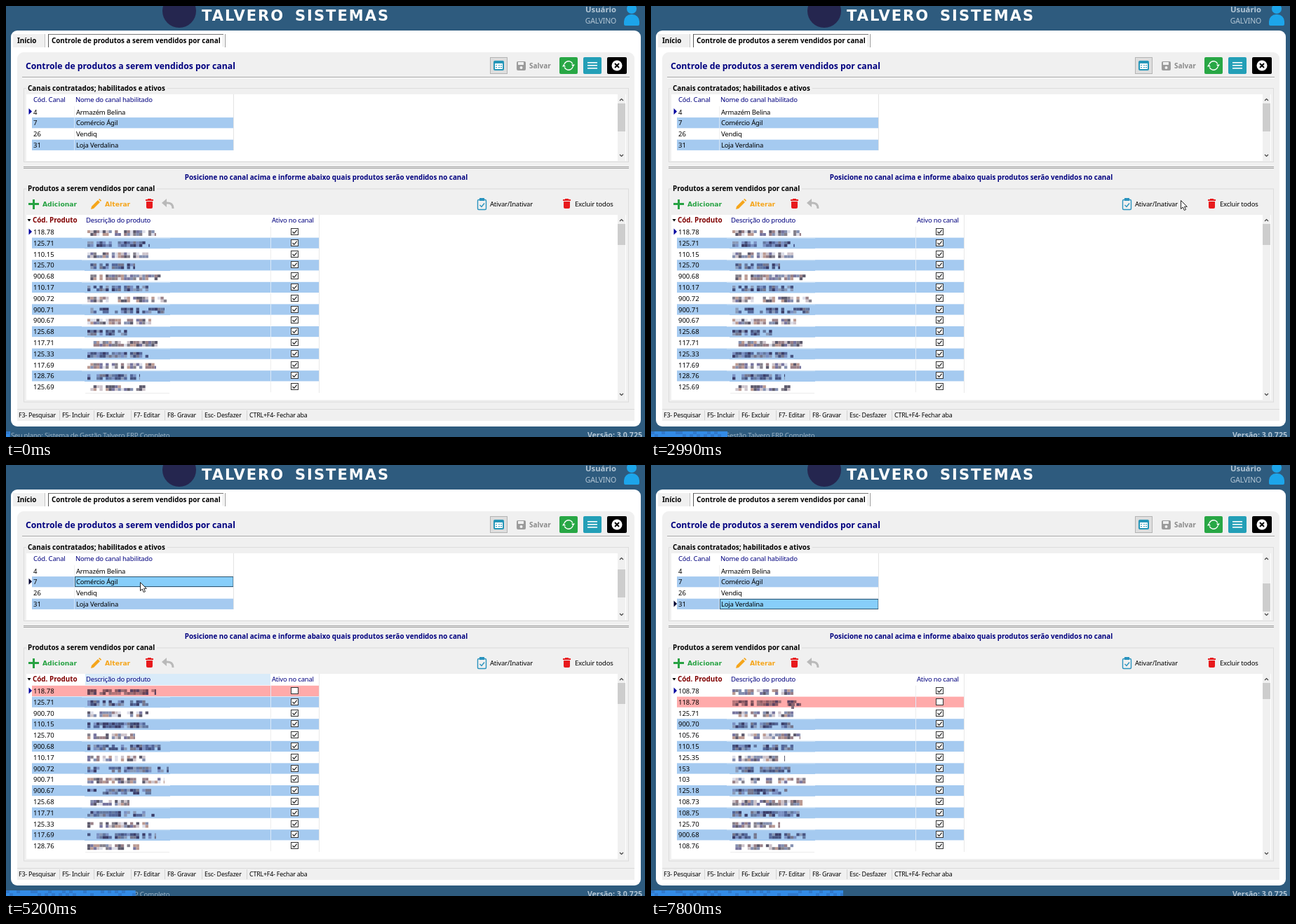
An HTML page with a canvas that plays this animation: 911x615 px, repeating every 8000 ms.

```html
<!DOCTYPE html>
<html lang="pt-BR">
<head>
<meta charset="utf-8">
<title>Controle de produtos</title>
<style>
html, body { margin: 0; width: 100%; height: 100%; overflow: hidden; background: #2e5b7e; }
canvas { display: block; width: 911px; height: 615px; }
</style>
</head>
<body>
<canvas id="stage" width="911" height="615"></canvas>
<script>
const g = document.getElementById('stage').getContext('2d');
const LOOP = 8000, STEP = 200, ROW = 15.8;
const NAVY = '#00007f', BLUE = '#a5caf0', PANEL = '#f0f0f0', SELECT = '#87cefa';

const CHANNELS = [['4', 'Armazém Belina'], ['7', 'Comércio Ágil'], ['26', 'Vendiq'], ['31', 'Loja Verdalina']];
const LIST_A = '118.78 125.71 110.15 125.70 900.68 110.17 900.72 900.71 900.67 125.68 117.71 125.33 117.69 128.76 125.69'.split(' ');
const LIST_B = [...LIST_A.slice(0, 2), '900.70', ...LIST_A.slice(2, 14)];
const LIST_C = '108.78 118.78 125.71 900.70 105.76 110.15 125.35 153 103 125.18 108.73 108.75 125.70 900.68 108.76'.split(' ');

// Right edge of each blurred description; others end at 203.
const BLUR_END = {
  '118.78': 214, '125.71': 205, '125.70': 184, '900.68': 221, '900.72': 232, '900.71': 226,
  '900.67': 207, '125.68': 176, '117.71': 217, '117.69': 214, '128.76': 191, '125.69': 199,
  '105.76': 213, '125.35': 191, '153': 208, '103': 221, '125.18': 195, '108.73': 217, '108.75': 217
};
const BLUR_COLORS = {
  white: ['#5d5a6c', '#9a8188', '#8590b0', '#cdc3ca', '#77759f', '#bb9a92', '#dcdde8', '#85818c'],
  blue: ['#475480', '#64789f', '#7b90c2', '#3b3d68', '#75768c', '#8a9ab8', '#54679a'],
  pink: ['#6d4655', '#8f5c64', '#b47378', '#5b4362', '#9c7076']
};

// Step, x, y of the pointer tip.
const PATH = [
  [3, 706, 598], [6, 622, 443], [9, 625, 330], [10, 625, 309], [12, 625, 309], [13, 700, 249],
  [14, 755, 276], [16, 755, 277], [18, 434, 349], [20, 433, 346], [22, 276, 279], [24, 190, 172],
  [25, 190, 166], [28, 192, 170], [30, 195, 183], [32, 196, 181], [33, 191, 201], [34, 191, 201],
  [35, 197, 262], [36, 199, 320], [37, 196, 334], [39, 196, 336]
];

function random(seed) {
  return () => {
    seed = (seed * 1664525 + 1013904223) >>> 0;
    return seed / 4294967296;
  };
}

function box(x, y, w, h, color) {
  g.fillStyle = color;
  g.fillRect(x, y, w, h);
}

function frame(x, y, w, h, color) {
  g.strokeStyle = color;
  g.lineWidth = 1;
  g.strokeRect(x + .5, y + .5, w - 1, h - 1);
}

function round(x, y, w, h, r, color) {
  g.fillStyle = color;
  g.beginPath();
  g.roundRect(x, y, w, h, r);
  g.fill();
}

function disc(x, y, r, color) {
  g.fillStyle = color;
  g.beginPath();
  g.arc(x, y, r, 0, 7);
  g.fill();
}

function shape(points, color) {
  g.fillStyle = color;
  g.beginPath();
  points.forEach(([x, y]) => g.lineTo(x, y));
  g.closePath();
  g.fill();
}

function line(points, color, width = 1) {
  g.strokeStyle = color;
  g.lineWidth = width;
  g.beginPath();
  points.forEach(([x, y], i) => i ? g.lineTo(x, y) : g.moveTo(x, y));
  g.stroke();
}

function text(str, x, y, { color = '#000', size = 9.5, bold = false, track = -.2, align = 'left', family = '"Noto Sans"' } = {}) {
  g.font = `${bold ? 'bold ' : ''}${size}px ${family}, sans-serif`;
  g.letterSpacing = track + 'px';
  g.textAlign = align;
  g.fillStyle = color;
  g.fillText(str, x, y);
}

const boldText = (str, x, y, opt) => text(str, x, y, { bold: true, size: 9.85, track: 0, ...opt });
const wideText = (str, x, y, color, size = 9.2, track = 0) =>
  text(str, x, y, { color, size, track, bold: true, family: '"DejaVu Sans"' });

function trash(x, y) {
  box(x, y + 1, 11, 2, '#e8191c');
  box(x + 3, y, 5, 1, '#e8191c');
  round(x + 1, y + 4, 9, 10, [0, 0, 2, 2], '#e8191c');
}

function header() {
  box(0, 0, 911, 615, '#2e5b7e');
  disc(247, 7, 24, '#25264f');
  wideText('TALVERO', 279, 20.5, '#fff', 21, 2);
  wideText('SISTEMAS', 412, 20.5, '#fff', 21, 2);
  boldText('Usuário', 870, 9, { size: 11.3, color: '#b3c6d5', align: 'right' });
  text('GALVINO', 870, 25, { size: 10.5, color: '#b3c6d5', align: 'right' });
  disc(892, 4, 7, '#1da5ea');
  round(881, 12, 22, 16, [10, 10, 2, 2], '#1da5ea');
}

function titleBar() {
  round(7, 35, 898, 565, 9, '#fff');
  box(10, 40, 45, 19, PANEL);
  boldText('Início', 16, 53);
  box(55, 40, 1, 19, '#c4c4c4');
  box(60, 40, 250, 1, '#777');
  box(60, 40, 1, 19, '#555');
  box(309, 41, 1, 17, '#ddd');
  box(312, 40, 1, 19, '#999');
  boldText('Controle de produtos a serem vendidos por canal', 65, 53);
  round(16, 66, 880, 526, [9, 9, 0, 0], PANEL);
  boldText('Controle de produtos a serem vendidos por canal', 28, 89.5, { size: 12.23, color: NAVY });
  box(23, 101, 866, 1, '#a4a4a4');
  box(23, 102, 866, 1, '#fff');

  box(690, 73, 25, 24, '#dedede');
  frame(690, 73, 25, 24, '#b4b4b4');
  round(695, 78, 15, 14, 2, '#2596b8');
  box(697, 82, 11, 8, '#fff');
  for (const y of [84, 87]) for (const x of [698, 702, 705]) box(x, y, 2, 1, '#2596b8');

  round(728, 79, 13, 13, 2, '#9b9b9b');
  box(730, 80, 8, 4, PANEL);
  disc(734.5, 88, 2, PANEL);
  boldText('Salvar', 746, 89, { size: 10, color: '#8b8b8b' });

  round(789, 73, 26, 24, 2, '#28a745');
  g.strokeStyle = '#fff';
  g.lineWidth = 1.4;
  for (const a of [Math.PI, 0]) {
    g.beginPath();
    g.arc(802, 85, 6.3, a + .25, a + 2.75);
    g.stroke();
  }
  shape([[793, 86.5], [798, 86.5], [795, 83]], '#fff');
  shape([[806, 83.5], [811, 83.5], [808.5, 87]], '#fff');

  round(823, 73, 26, 24, 2, '#239fb7');
  for (const y of [80, 84, 88]) box(829, y, 14, 1.6, '#fff');
  round(857, 73, 28, 24, 2, '#000');
  disc(871, 85, 7.5, '#fff');
  line([[868, 82], [874, 88]], '#000', 2);
  line([[874, 82], [868, 88]], '#000', 2);
}

function group(label, y, h, width) {
  frame(25, y, 863, h, '#dcdcdc');
  box(29, y - 3, width, 7, PANEL);
  boldText(label, 31, y + 3.5);
}

function scrollbar(top, bottom, thumb, size) {
  box(872, top, 11, bottom - top, PANEL);
  box(872, thumb, 11, size, '#cdcdcd');
  line([[875, top + 9], [877.5, top + 6.5], [880, top + 9]], '#444', 1.2);
  line([[875, bottom - 9], [877.5, bottom - 6.5], [880, bottom - 9]], '#444', 1.2);
}

const rowMark = (y, color) => shape([[32.5, y - 4.5], [37, y], [32.5, y + 4.5]], color);

function selectedCell(x, y, w, h) {
  box(x, y, w, h, SELECT);
  frame(x, y, w, h, '#2f5670');
}

function channelGrid(current, focused) {
  group('Canais contratados; habilitados e ativos', 117, 106, 201);
  box(29, 126, 855, 95, '#fff');
  text('Cód. Canal', 39, 137, { color: NAVY });
  text('Nome do canal habilitado', 99, 137, { color: NAVY });
  CHANNELS.forEach(([code, name], i) => {
    const y = 150.5 + i * ROW, top = y - 7.2;
    if (i % 2) box(37, top, 287.5, 15.2, BLUE);
    box(97, top, 1, 15.2, i % 2 ? '#d5e6f7' : '#f0f0f0');
    if (focused && i === current) selectedCell(98, Math.round(top), 226.5, 15);
    text(code, 39, y + 4, { track: 0 });
    text(name, 100, y + 4);
    if (i === current) rowMark(y, focused ? '#000030' : '#0000a0');
  });
  box(324, 126, 1, 80, '#e4e4e4');
  scrollbar(126, 221, [139, 149, 159, 169][current], 40);
}

function productTools() {
  box(25, 229, 863, 1, '#a0a0a0');
  box(25, 231, 863, 1, '#a0a0a0');
  boldText('Posicione no canal acima e informe abaixo quais produtos serão vendidos no canal', 456.5, 247.5,
    { color: NAVY, align: 'center', size: 9.8 });
  group('Produtos a serem vendidos por canal', 260.5, 305, 186);
  box(38, 276, 3, 14, '#27a243');
  box(32, 281, 15, 3, '#27a243');
  wideText('Adicionar', 52, 286, '#27a243');
  shape([[122, 286], [131, 277], [134, 280], [125, 289], [121, 290]], '#f5a51b');
  shape([[132, 276], [133.5, 275], [136, 277.5], [135, 279]], '#f5a51b');
  wideText('Alterar', 141, 286, '#f5a51b');
  trash(199, 275);
  shape([[222, 281], [229, 275], [229, 287]], '#b9b9b9');
  g.strokeStyle = '#b9b9b9';
  g.lineWidth = 3;
  g.beginPath();
  g.moveTo(228, 281);
  g.quadraticCurveTo(238, 280, 238, 289);
  g.stroke();

  g.strokeStyle = '#2a93be';
  g.lineWidth = 1.4;
  g.beginPath();
  g.roundRect(672.5, 276.5, 12, 14, 1.5);
  g.stroke();
  box(675, 274, 7, 4, '#2a93be');
  line([[675.5, 284], [678, 286.5], [682, 281.5]], '#2a93be', 1.4);
  text('Ativar/Inativar', 690, 286);
  trash(794, 275);
  text('Excluir todos', 811, 286);
}

function blur(code, i, y, tone, phase) {
  const rnd = random(parseInt(code.replace('.', ''), 10) * 7919 + i * 331 + phase * 101);
  const colors = BLUR_COLORS[tone];
  const end = BLUR_END[code] || 203;
  rnd();
  for (let x = 116; x < end - 1; x += 4.35) {
    if (rnd() < .13) { rnd(); continue; }
    for (const dy of [-2, 2]) {
      if (rnd() < .86) box(x, y + dy, Math.min(4.35, end - x), 4, colors[rnd() * colors.length | 0]);
    }
  }
}

function checkbox(y, on) {
  box(406, y - 5, 11, 10, '#fff');
  frame(406, y - 5, 11, 10, '#333');
  if (on) line([[408.5, y], [410.7, y + 2.3], [414.7, y - 2.3]], '#222', 1.2);
}

function productGrid(list, { inactive, headerLit, cellLit, thumb, phase }) {
  box(29, 298, 855, 264, '#fff');
  if (headerLit) box(113, 298, 264, 16, '#d9ebf9');
  shape([[30.5, 304], [35.5, 304], [33, 307.5]], '#000');
  boldText('Cód. Produto', 38, 309, { color: '#800000' });
  text('Descrição do produto', 114, 309, { color: NAVY });
  text('Ativo no canal', 379, 309, { color: NAVY });
  list.forEach((code, i) => {
    const y = 322 + i * ROW, top = y - 7.2;
    const off = inactive && code === '118.78';
    const tone = off ? 'pink' : i % 2 ? 'blue' : 'white';
    const band = { pink: '#ffaaaa', blue: BLUE, white: '#fff' }[tone];
    box(37, top, 409, 15.2, band);
    if (tone === 'blue') {
      box(108, top, 126, 1, '#d3e5f7');
      box(112, top + 14, 122, 2, BLUE);
    }
    if (off && cellLit) selectedCell(113, Math.round(top), 264, 15);
    box(377, top, 1, 15.2, tone === 'white' ? '#ececec' : '#dceaf8');
    text(code, 39, y + 4, { track: 0 });
    blur(code, i, y, off && cellLit ? 'blue' : tone, phase);
    checkbox(Math.round(y), !off);
  });
  box(446, 298, 1, 254, '#e8e8e8');
  box(113, 552, 120, 1, '#ececec');
  rowMark(322, '#0000a0');
  scrollbar(298, 562, 311, thumb);
}

function footer(t) {
  box(16, 575, 880, 1, '#dadada');
  const keys = [['F3- Pesquisar', 18], ['F5- Incluir', 80], ['F6- Excluir', 129], ['F7- Editar', 182],
    ['F8- Gravar', 230], ['Esc- Desfazer', 283], ['CTRL+F4- Fechar aba', 347]];
  keys.forEach(([label, x], i) => {
    if (i) box(x - 4, 577, 1, 14, '#d2d2d2');
    text(label, x, 587, { size: 8.9 });
  });
  text('Seu plano: Sistema de Gestão Talvero ERP Completo', 7, 616, { size: 9.7, color: '#9db4c6' });
  boldText('Versão: 3.0.725', 907, 616, { size: 10.6, color: '#b3c6d5', align: 'right' });

  const w = 6 + t * 268 / 7800;
  box(0, 607, w, 8, '#338be6');
  const rnd = random(77);
  for (let x = 0; x < w; x += 5) {
    const soft = rnd() < .6, y = 607 + (rnd() * 2 | 0) * 4;
    if (soft) box(x, y, Math.min(5, w - x), 4, '#3079cc');
  }
}

function dialog() {
  g.save();
  g.shadowColor = 'rgba(0,0,0,.36)';
  g.shadowBlur = 8;
  g.shadowOffsetX = 2;
  g.shadowOffsetY = 3;
  box(233, 261, 283, 111, '#fff');
  g.restore();
  box(233, 340, 283, 32, PANEL);
  frame(233, 261, 283, 111, '#6b6b6b');
  text('Confirme', 236, 274, { size: 8.9 });
  line([[502, 269], [506, 273]], '#eee');
  line([[506, 269], [502, 273]], '#eee');
  disc(261, 310, 11.5, '#0b4f91');
  disc(261, 310, 10.3, '#1268b3');
  boldText('?', 261, 316, { size: 17, color: '#fff', align: 'center' });
  text('Deseja Inativar o produto "118.78" em todos os canais?', 281, 314, { size: 8.6 });
  box(385, 348, 55, 16, '#e1f0fb');
  frame(385, 348, 55, 16, '#0078d7');
  text('Sim', 412, 359.5, { size: 8.8, align: 'center' });
  box(448, 348, 55, 16, '#e1e1e1');
  frame(448, 348, 55, 16, '#adadad');
  text('Não', 475.5, 359.5, { size: 8.8, align: 'center' });
}

function hint() {
  g.beginPath();
  g.moveTo(-5, 121.5);
  g.lineTo(208, 121.5);
  g.quadraticCurveTo(212.5, 121.5, 212.5, 126);
  g.lineTo(212.5, 156);
  g.quadraticCurveTo(212.5, 160.5, 208, 160.5);
  g.lineTo(201.5, 160.5);
  g.lineTo(201.5, 174.5);
  g.lineTo(187, 160.5);
  g.lineTo(-5, 160.5);
  g.fillStyle = '#fff';
  g.fill();
  g.strokeStyle = '#000';
  g.lineWidth = 1.2;
  g.stroke();
  text('Lista todos os canais de venda contratados pela sua empresa.', 204, 152, { size: 8.6, align: 'right' });
}

function pointer(step) {
  const next = PATH.findIndex(p => p[0] >= step);
  if (step < PATH[0][0] || next < 0) return;
  const b = PATH[next], a = PATH[Math.max(0, next - 1)];
  const k = b[0] === a[0] ? 1 : (step - a[0]) / (b[0] - a[0]);
  const x = Math.round(a[1] + (b[1] - a[1]) * k), y = Math.round(a[2] + (b[2] - a[2]) * k);
  // Inside the blurred column the pointer turns into coarse blocks.
  if (x > 113 && x < 235 && y > 313) {
    box(x, y + 4, 9, 4, '#8c6470');
    box(x, y + 4, 4, 4, '#5a4358');
    box(x + 4, y + 8, 4, 4, '#817080');
    return;
  }
  const arrow = [[0, 0], [0, 12], [2.8, 9.5], [4.8, 14], [7, 13], [5, 8.8], [8.8, 8.8]]
    .map(([dx, dy]) => [x + dx + .5, y + dy + .5]);
  shape(arrow, '#fff');
  line([...arrow, arrow[0]], '#222', 1);
}

function draw(time) {
  const step = Math.min(39, Math.floor((time + 10) / STEP));
  const channel = step < 25 ? 0 : step < 32 ? 1 : step < 33 ? 2 : 3;
  header();
  titleBar();
  channelGrid(channel, channel > 0);
  productTools();
  productGrid([LIST_A, LIST_B, LIST_B, LIST_C][channel], {
    inactive: step >= 20,
    headerLit: step >= 20 && step < 36,
    cellLit: step >= 20 && step < 25,
    thumb: channel === 3 ? 23 : 30,
    phase: step < 16 ? 0 : step < 20 ? 1 : 2
  });
  footer(step * STEP);
  if (step >= 16 && step < 20) dialog();
  if (step >= 28 && step < 31) hint();
  pointer(step);
}

function tick(now) {
  draw(now % LOOP);
  requestAnimationFrame(tick);
}
draw(0);
requestAnimationFrame(tick);
</script>
</body>
</html>
```
